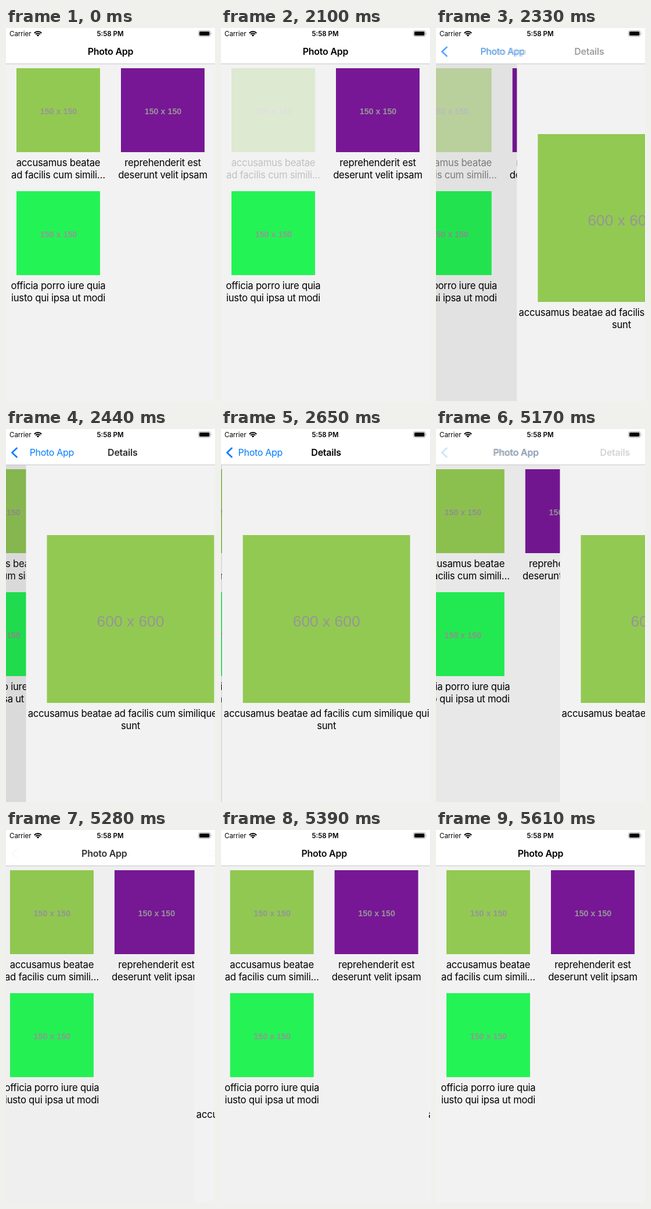
Animation, 360 px wide and 640 px high, one loop 5.71 s. Source, as an HTML page:

```html
<!DOCTYPE html>
<html lang="en">
<head>
<meta charset="utf-8">
<title>Photo App</title>
<style>
  html, body { margin: 0; width: 100%; height: 100%; overflow: hidden; background: #f2f2f2; }
  svg { display: block; width: 360px; height: 640px; }
  text { font-family: Inter, "Open Sans", sans-serif; }
  .mid { text-anchor: middle; }
  .caption { font-size: 16.7px; letter-spacing: -.25px; text-anchor: middle; }
  .size { font-family: "Liberation Sans", Arial, sans-serif; fill: #969696; text-anchor: middle; }
  .small { font-size: 14.3px; font-weight: 700; }
  .large { font-size: 26.4px; }
  .status { font-size: 11.5px; }
  .title { font-size: 16px; font-weight: 600; letter-spacing: -.25px; text-anchor: middle; }
  .back { font-size: 16px; letter-spacing: -.3px; fill: #007aff; }
</style>
</head>
<body>
<svg viewBox="0 0 360 640">
  <rect width="360" height="640" fill="#f2f2f2"/>

  <g id="list">
    <g id="picked">
      <rect x="18" y="69" width="144" height="144" fill="#92c952"/>
      <text class="size small" x="90.5" y="148">150 x 150</text>
      <text class="caption" x="90" y="237">accusamus beatae</text>
      <text class="caption" x="90" y="258">ad facilis cum simili…</text>
    </g>
    <rect x="198" y="69" width="144" height="144" fill="#771796"/>
    <text class="size small" x="270.5" y="148">150 x 150</text>
    <text class="caption" x="270" y="237">reprehenderit est</text>
    <text class="caption" x="270" y="258">deserunt velit ipsam</text>
    <rect x="18" y="280" width="144" height="144" fill="#24f355"/>
    <text class="size small" x="90.5" y="359">150 x 150</text>
    <text class="caption" x="90" y="448">officia porro iure quia</text>
    <text class="caption" x="90" y="469">iusto qui ipsa ut modi</text>
  </g>
  <rect id="dim" y="62" width="360" height="578"/>

  <g id="detail">
    <rect y="62" width="362" height="578" fill="#f2f2f2"/>
    <rect x="36" y="182" width="288" height="288" fill="#92c952"/>
    <text class="size large" x="180" y="338.5">600 x 600</text>
    <text class="caption" x="180" y="494">accusamus beatae ad facilis cum similique qui</text>
    <text class="caption" x="180" y="515">sunt</text>
  </g>

  <rect width="360" height="61" fill="#fff"/>
  <rect y="61" width="360" height="1" fill="#c6c6c6"/>
  <text class="title" id="listTitle" x="180" y="46">Photo App</text>
  <text class="title" id="detailTitle" x="180" y="46">Details</text>
  <g id="back">
    <path d="M18.6 32.8 10.4 40.5 18.6 48.2" fill="none" stroke="#007aff" stroke-width="2.6" stroke-linecap="round" stroke-linejoin="round"/>
    <text class="back" id="backLabel" x="29" y="46">Photo App</text>
  </g>

  <text class="status" x="6" y="14">Carrier</text>
  <g fill="none" stroke="#000" stroke-width="2">
    <path d="M48.8 8.7A8.6 8.6 0 0 1 61.2 8.7M51.1 10.9A5.4 5.4 0 0 1 58.9 10.9"/>
    <path d="M55 14.6 52.7 12.4A3.2 3.2 0 0 1 57.3 12.4Z" fill="#000" stroke="none"/>
  </g>
  <text class="status mid" x="179.5" y="14" font-weight="600">5:58 PM</text>
  <rect x="331.5" y="4.5" width="20.5" height="10" rx="3" fill="none" stroke="#a0a0a0"/>
  <rect x="333" y="6" width="17.5" height="7" rx="1.7"/>
  <path d="M353.2 7.7Q355 9.5 353.2 11.3Z" fill="#a0a0a0"/>
</svg>
<script>
  const LOOP = 5710;
  const STEPS = [0, 2100, 2210, 2330, 2440, 2540, 2650, 4880, 5060, 5170, 5280, 5390, 5500, 5610];
  const PRESS = 2100, RELEASE = 2230, PUSH = 2208, SETTLED = 4880, POP = 5053, DONE = 5610;
  const FADE = 250, WIDTH = 360;

  const $ = id => document.getElementById(id);
  const clamp = v => Math.min(1, Math.max(0, v));
  const smooth = v => v * v * (3 - 2 * v);
  const inOutQuad = v => v < .5 ? 2 * v * v : 1 - 2 * (1 - v) ** 2;
  const move = (id, x) => $(id).setAttribute('transform', `translate(${x.toFixed(2)} 0)`);
  const fade = (id, v) => $(id).setAttribute('opacity', v.toFixed(3));

  // Critically damped spring from 0 to 1
  function spring(ms) {
    const a = .017 * Math.max(0, ms);
    return 1 - (1 + a) * Math.exp(-a);
  }

  // Share of the detail page that is on screen
  function shown(t) {
    if (t >= DONE) return 0;
    if (t >= POP) return 1 - spring(t - POP);
    return t >= SETTLED ? 1 : spring(t - PUSH);
  }

  // Opacity of a control pressed at one time and released at another
  function touch(t, down, up) {
    return t < down ? 1 : .2 + .8 * inOutQuad(clamp((t - up) / FADE));
  }

  function draw(t) {
    const p = shown(t), q = 1 - p;
    move('list', -.3 * WIDTH * p);
    move('detail', (WIDTH + 2) * q - 2 * q * p);
    move('listTitle', -104 * p);
    move('detailTitle', 217 * q);
    move('backLabel', 122 * q);
    fade('picked', touch(t, PRESS, RELEASE));
    fade('dim', .11 * p);
    fade('listTitle', q * q);
    fade('detailTitle', p * p);
    fade('back', smooth(p) * touch(t, SETTLED, POP));
  }

  let last = -1;
  function tick() {
    const now = performance.now() % LOOP;
    const step = STEPS.findLast(s => s <= now);
    if (step !== last) draw(last = step);
    requestAnimationFrame(tick);
  }
  tick();
</script>
</body>
</html>
```
